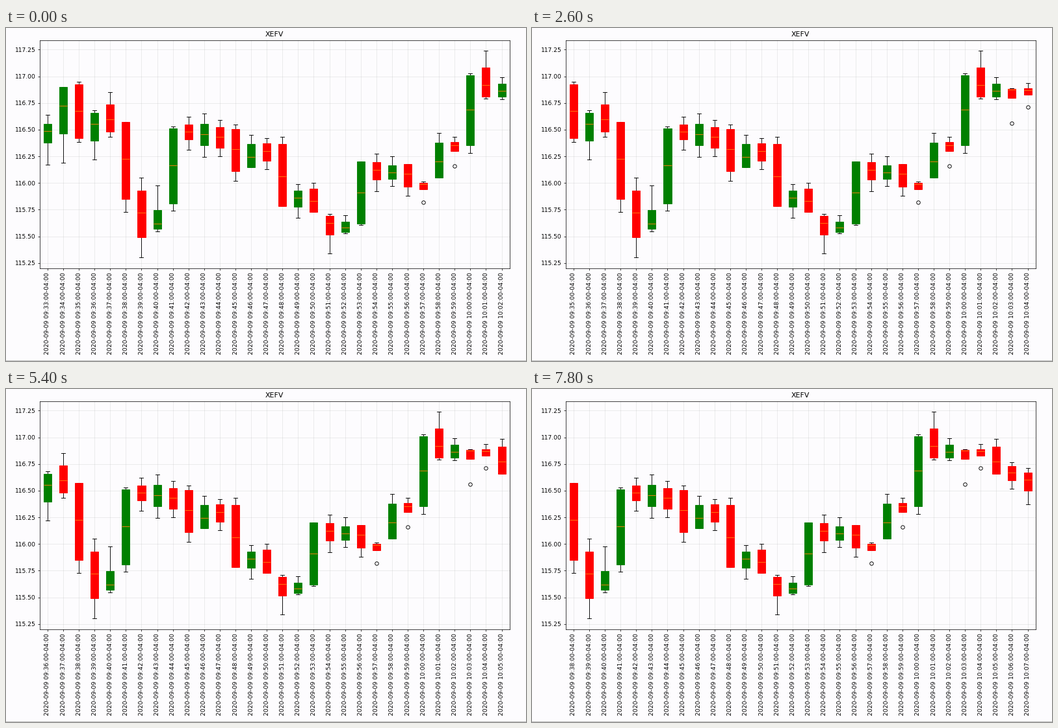
These frames come from a looping animation (800 by 514 pixels, 8 s). A matplotlib script:

```python
import numpy as np
import matplotlib.pyplot as plt
from matplotlib.animation import FuncAnimation

W, H, DPI = 800, 514, 64
BG = "#fdfcfe"
VISIBLE = 30                      # candles in the window
STEP_MS = 200
FRAMES = 40
ARRIVALS = (1000, 2600, 4200, 5600, 7200)   # ms at which a new minute comes in

# open, high, low, close per minute, in cents above 115
OHLC = np.array([
    (144.5, 164, 117, 152.5), (155.5, 190, 118.7, 190),
    (191.6, 195, 138.4, 143), (145.7, 168, 122, 165),
    (170, 185, 143, 149.5), (157, 157, 73, 88.6),
    (89, 105, 30, 55.5), (57.8, 98, 54.7, 66.5),
    (83, 153, 74, 150.7), (152.4, 162, 131, 144.5),
    (139, 165, 124.5, 152), (150.5, 159, 125, 136),
    (149, 155, 102, 114), (115, 145, 115, 134),
    (136, 142, 113, 123.5), (134.5, 143, 78.5, 78.5),
    (81, 99, 67.5, 91), (93, 100, 73, 73),
    (68.3, 71, 34, 57), (54.3, 70, 53, 61.7),
    (62.4, 120, 60.4, 120), (117, 127.3, 92, 107),
    (106, 125, 97, 114), (118, 118, 88, 99),
    (100, 101.5, 82, 98), (105, 147, 105, 134.8),
    (136.5, 143, 116, 134.7), (138, 203, 128, 200),
    (203, 224.3, 179, 181.3), (181.5, 199, 178.3, 191),
    (188, 189, 156, 187.8), (187.3, 194, 171, 186.7),
    (189, 198.6, 166, 166), (172, 177, 152, 162.5),
    (166, 171, 137, 154),
])
PRICES = 115 + OHLC / 100
MINUTES = np.arange(len(PRICES))


def pt(size):
    """Point size scaled to the stage."""
    return size * 1.03


def stamp(i):
    hour, minute = divmod(9 * 60 + 33 + i, 60)
    return f"2020-09-09 {hour:02d}:{minute:02d}:00-04:00"


plt.rcParams.update({
    "font.family": "DejaVu Sans",
    "axes.linewidth": pt(0.8),
    "xtick.major.width": pt(0.8), "ytick.major.width": pt(0.8),
    "xtick.major.size": pt(3.5), "ytick.major.size": pt(3.5),
    "xtick.major.pad": pt(3.5), "ytick.major.pad": pt(3.5),
})

fig = plt.figure(figsize=(W / DPI, H / DPI), dpi=DPI, facecolor=BG)
left, right, top, bottom = 51.9, 774.6, 18.5, 371.0
ax = fig.add_axes([left / W, 1 - bottom / H, (right - left) / W, (bottom - top) / H],
                  facecolor=BG)

line = dict(color="black", linewidth=pt(1))
parts = ax.boxplot(
    PRICES.T, positions=MINUTES, widths=0.5, patch_artist=True,
    manage_ticks=False, whiskerprops=line, capprops=line,
    medianprops=dict(color="#ff7f0e", linewidth=pt(1)),
    flierprops=dict(marker="o", markersize=pt(6), markerfacecolor="none",
                    markeredgecolor="black", markeredgewidth=pt(1)))
for box, (start, _, _, end) in zip(parts["boxes"], PRICES):
    color = "green" if end > start else "red"
    box.set(facecolor=color, edgecolor=color, linewidth=pt(1), zorder=2.05)

ax.set_title("XEFV", fontsize=pt(12), pad=pt(6))
ax.set_xticks(MINUTES, [stamp(i) for i in MINUTES], rotation=90, fontsize=pt(10))
ticks = np.arange(115.25, 117.3, 0.25)
ax.set_yticks(ticks, [f"{v:.2f}" for v in ticks], fontsize=pt(10))
ax.set_ylim(115.1996, 117.3411)
ax.grid(color="#b0b0b0", alpha=0.3, linewidth=pt(0.8))

# rule along the bottom edge
fig.add_artist(plt.Rectangle((0, 0), 1, 1 / H, transform=fig.transFigure,
                             facecolor="#bdbdbd", edgecolor="none"))


def draw(i):
    first = sum(i * STEP_MS >= t for t in ARRIVALS)
    ax.set_xlim(first - 0.5, first + VISIBLE - 0.5)
    return []


anim = FuncAnimation(fig, draw, frames=FRAMES, interval=STEP_MS,
                     repeat=True, repeat_delay=0, blit=False)
plt.show()
```
